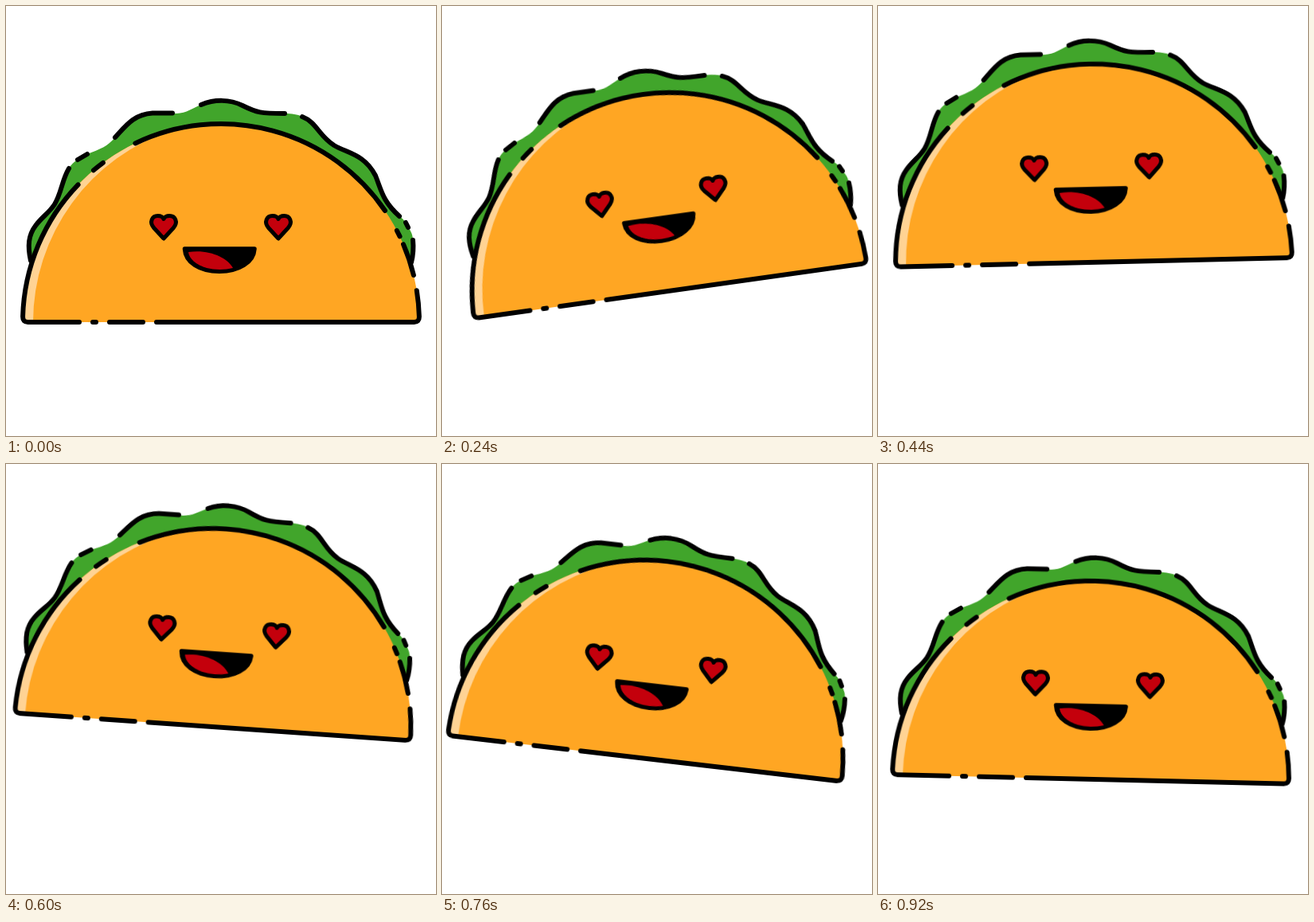
An HTML page for the animation above (960 ms loop, 540 px wide and 540 px high).

```html
<!DOCTYPE html>
<html lang="en">
<head>
<meta charset="utf-8">
<title>Happy taco</title>
<style>
  html, body { margin: 0; width: 100%; height: 100%; overflow: hidden; background: #fff; }
  svg { display: block; width: 100vw; height: 100vh; }
  #taco { transform-origin: 270px 270px; }
  .line { fill: none; stroke: #000; stroke-width: 6; stroke-linecap: round; stroke-linejoin: round; }
  .heart { fill: #c4000c; stroke: #000; stroke-width: 5; stroke-linejoin: round; }
</style>
</head>
<body>
<svg viewBox="0 0 540 540">
  <defs>
    <path id="heart" class="heart" d="M198 292L186 279C179 271 184 263.5 190.5 263.5C194 263.5 197 265 198 267.5C199 265 202 263.5 205.5 263.5C212 263.5 217 271 210 279Z"/>
  </defs>
  <g id="taco">
    <path id="leaf" fill="#41a52b"/>
    <path id="leafLine" class="line"/>
    <path id="shell" fill="#ffa623"/>
    <path id="shine" fill="#ffd394"/>
    <path id="shellLine" class="line"/>
    <use href="#heart"/>
    <use href="#heart" x="144"/>
    <path d="M224.500 305H312C311 322 292 333.300 268 333.300C243 333.300 225.500 322 224.500 305Z" stroke="#000" stroke-width="5.500" stroke-linejoin="round"/>
    <path fill="#c4000c" d="M229 309C255 305 278 316 285 329C275 331.500 262 331.500 252 329C238 325 230 317 229 309Z"/>
  </g>
</svg>
<script>
const draw = (id, d) => document.getElementById(id).setAttribute('d', d);

// Lettuce edge: inked and bare pieces alternate.
const edge = [
  'C27 301 28 288 37 276C45 265 54 260 61 249C70 234 70 219 79 204',
  'C82 199 85 196 90 193',
  'L102 186',
  'C118 180 128 176 137 165',
  'C150 151 160 136 184 134.5L209 134.5',
  'C224 137 234 128 245 124',
  'C262 117 281 117 297 125C315 134 320 135 350 135',
  'C359 135 366 136 372 139',
  'C390 146 393 163 412 175C429 185 450 186 464 213C472 233 473 245 494 264',
  'C498 267 500 269 502 272',
  'L505 278',
  'C509 283 511 288 511 294',
  'C512 304 512 310 509 322'
];
const first = '31 320';
const endOf = piece => piece.match(/[\d.]+ [\d.]+$/)[0];
draw('leaf', `M${first}${edge.join('')}L270 390Z`);
draw('leafLine', edge
  .map((piece, i) => i % 2 ? '' : `M${i ? endOf(edge[i - 1]) : first}${piece}`)
  .join(''));

// Shell rim: angles in degrees, clockwise from the left end.
const R = 249, CORNER = 1.6;
const rim = deg => {
  const a = deg * Math.PI / 180;
  return `${270 - R * Math.cos(a)} ${397 - R * Math.sin(a)}`;
};
const arcTo = deg => `A${R} ${R} 0 0 1 ${rim(deg)}`;
const arc = (from, to) => `M${rim(from)}${arcTo(to)}`;
const leftCorner = `H27.500Q21 397 ${rim(CORNER)}`;
const rightCorner = 'Q519 397 512.500 397';
draw('shell', `M270 397${leftCorner}${arcTo(180 - CORNER)}${rightCorner}Z`);
draw('shine', `M34 397${leftCorner}${arcTo(76)}A254.4 254.4 0 0 0 34 397Z`);
draw('shellLine', [
  `M92 397${leftCorner}${arcTo(43.9)}`,
  arc(50, 53.5),
  arc(64.4, 145.8),
  arc(152.5, 154.4),
  arc(156.9, 166.3),
  `${arc(170.8, 180 - CORNER)}${rightCorner}H189`,
  'M172 397H130',
  'M113 397H109'
].join(''));

// Hop with a quadratic ease, rock with a linear swing, held 40 ms per pose.
const STEPS = 24, STEP_MS = 40, DRIFT = -1.9, HOP = -76.2, TILT = -8;
const ease = x => x < 0.5 ? 2 * x * x : 1 - 2 * (1 - x) ** 2;
const swing = p => p < 0.25 ? 4 * p : p < 0.75 ? 2 - 4 * p : 4 * p - 4;
const poses = Array.from({ length: STEPS + 1 }, (_, i) => {
  const p = i / STEPS;
  const lift = ease(1 - Math.abs(1 - 2 * p));
  return {
    offset: p,
    easing: 'steps(1, end)',
    transform: `translate(${DRIFT * lift}px, ${HOP * lift}px) rotate(${TILT * swing(p)}deg)`
  };
});
document.getElementById('taco').animate(poses, { duration: STEPS * STEP_MS, iterations: Infinity });
</script>
</body>
</html>
```
